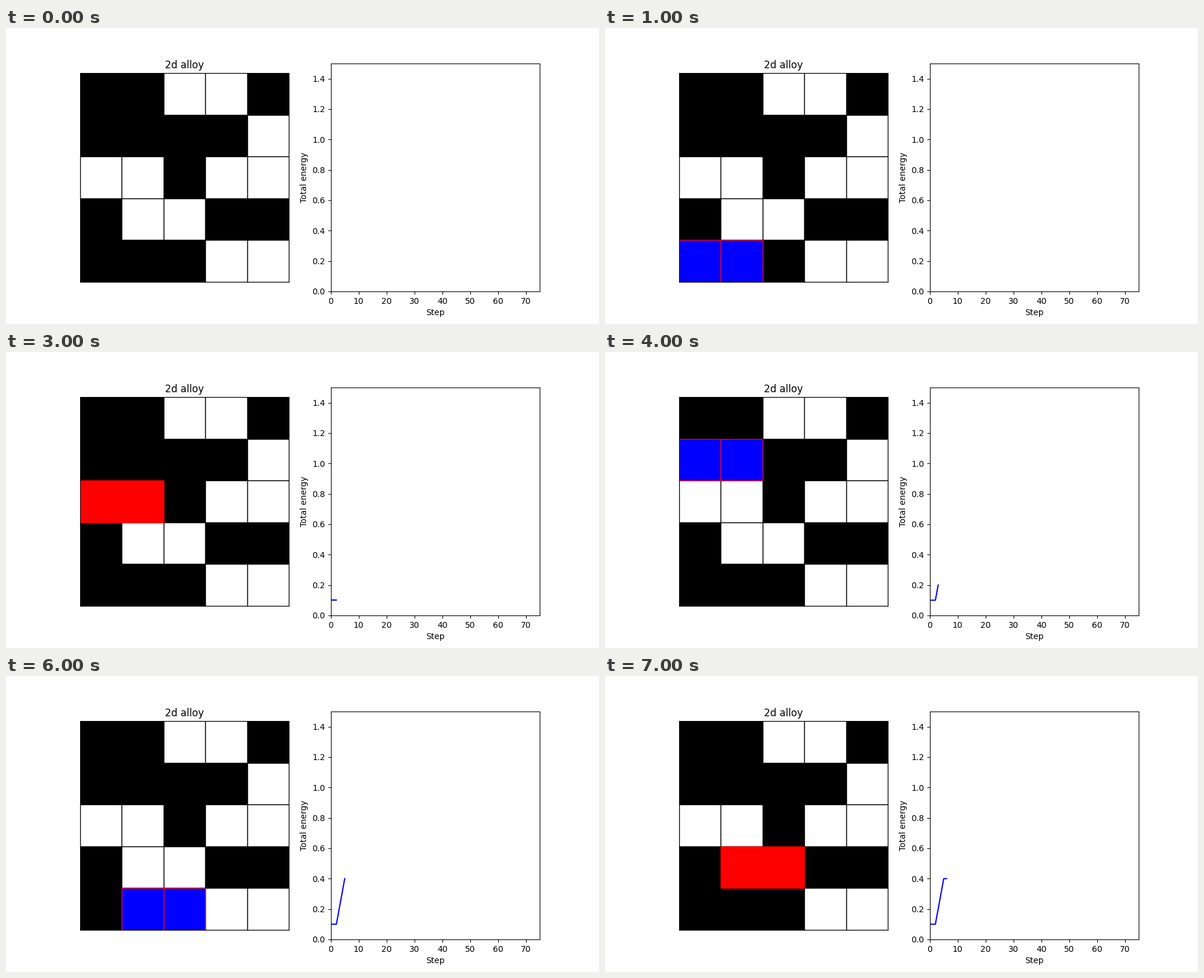
A matplotlib script that plays this animation: 1000 px wide and 500 px high, repeating every 8 s.

```python
import matplotlib.pyplot as plt
from matplotlib.animation import FuncAnimation
from matplotlib.patches import Rectangle

# Rows from top to bottom, 1 = black atom
ALLOY = ["11001", "11110", "00100", "10011", "11100"]
SIZE = len(ALLOY)
STEPS = 7
BOND_ENERGY = 0.1

plt.rcParams["font.family"] = "DejaVu Sans"
fig, (grid_ax, energy_ax) = plt.subplots(1, 2, figsize=(10, 5), dpi=100)


def add_cell(col, row, face, edge, zorder=1):
    cell = Rectangle((col, SIZE - 1 - row), 1, 1, facecolor=face,
                     edgecolor=edge, linewidth=1, zorder=zorder)
    return grid_ax.add_patch(cell)


def pair_at(step):
    """Column and row of the left cell: scan upwards, then move right."""
    return step // SIZE, SIZE - 1 - step % SIZE


def is_bond(step):
    col, row = pair_at(step)
    return ALLOY[row][col:col + 2] == "11"


energies = []
total = 0.0
for step in range(STEPS):
    total += BOND_ENERGY * is_bond(step)
    energies.append(total)

grid_ax.set(xlim=(0, SIZE), ylim=(0, SIZE), xticks=[], yticks=[],
            aspect="equal", title="2d alloy")
for row, atoms in enumerate(ALLOY):
    for col, atom in enumerate(atoms):
        add_cell(col, row, "black" if atom == "1" else "white", "black")
markers = [add_cell(0, 0, "red", "red", zorder=2) for _ in range(2)]

energy_ax.set(xlim=(0, 75), ylim=(0, 1.5), xlabel="Step",
              ylabel="Total energy")
curve, = energy_ax.plot([], [], color="blue", linewidth=1.5)


def update(count):
    curve.set_data(range(count), energies[:count])
    for offset, marker in enumerate(markers):
        marker.set_visible(count > 0)
        if count:
            col, row = pair_at(count - 1)
            marker.set_xy((col + offset, SIZE - 1 - row))
            marker.set_facecolor("blue" if is_bond(count - 1) else "red")
    return [curve, *markers]


anim = FuncAnimation(fig, update, frames=STEPS + 1, interval=1000,
                     repeat=True, repeat_delay=0, blit=False)
plt.show()
```
